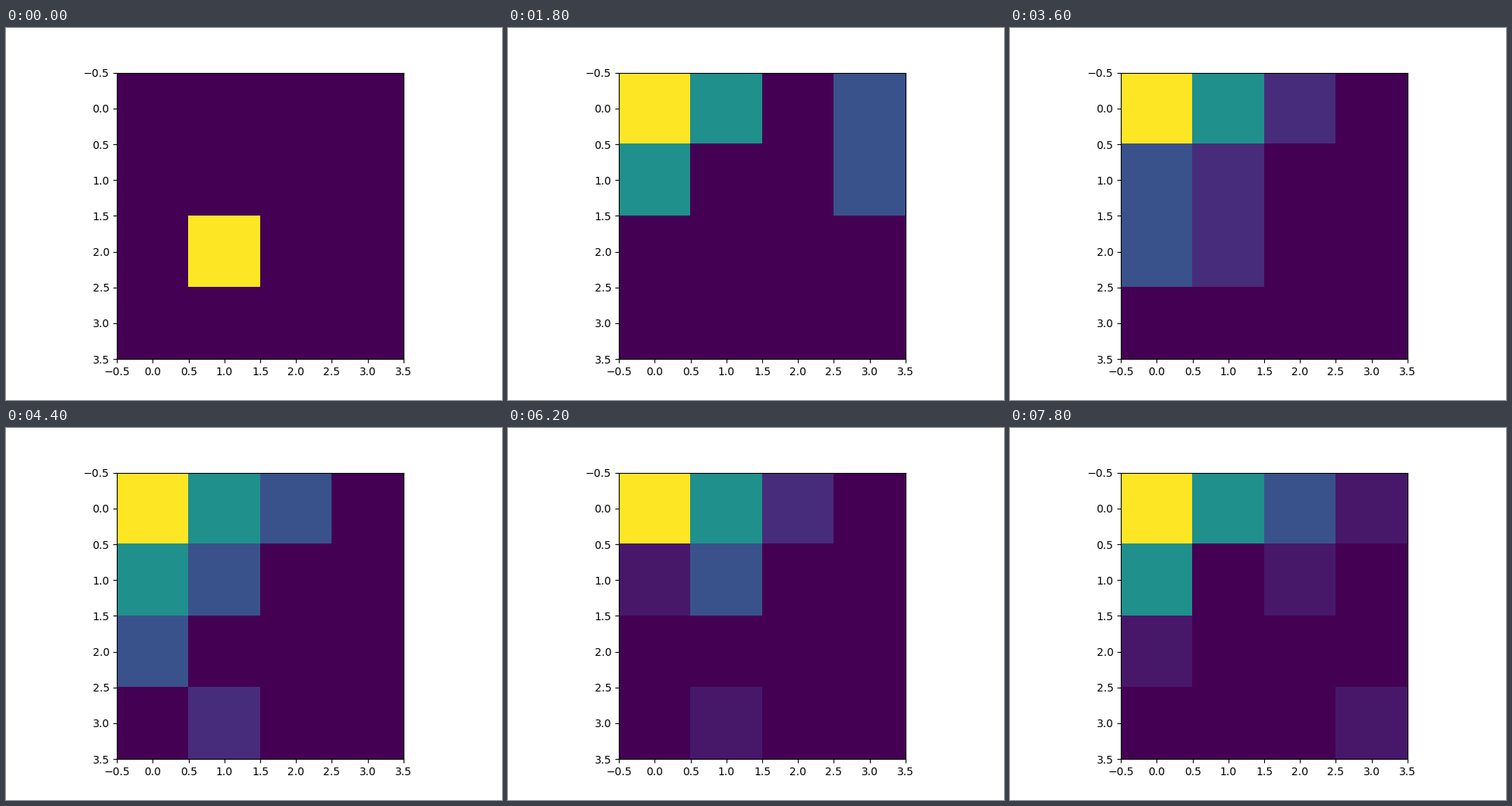
A matplotlib script that plays this animation: 640 px wide and 480 px high, repeating every 8000 ms.

```python
import numpy as np
import matplotlib.pyplot as plt
from matplotlib.animation import FuncAnimation

SIZE = 4
STEP_MS = 200

# Row and column of the new tile placed at every step.
SPAWNS = (
    "21 03 32 21 13 32 33 12 23 13 31 22 13 12 23 12 30 23 21 31 "
    "32 22 31 32 23 31 23 22 23 31 22 31 32 13 30 22 33 21 32 33"
).split()


def slide(line):
    """Push a line to its start, merging equal neighbours once."""
    tiles = [v for v in line if v]
    out = []
    while tiles:
        value = tiles.pop(0)
        if tiles and tiles[0] == value:
            value += tiles.pop(0)
        out.append(value)
    return out + [0] * (SIZE - len(out))


def move_left(board):
    return np.array([slide(row) for row in board])


def move_up(board):
    return move_left(board.T).T


def play():
    """Alternate up and left moves, adding a 2 after each one."""
    board = np.zeros((SIZE, SIZE), dtype=int)
    boards = []
    for step, (row, col) in enumerate(SPAWNS):
        board = move_up(board) if step % 2 else move_left(board)
        board[int(row), int(col)] = 2
        boards.append(board.copy())
    return boards


boards = play()

fig, ax = plt.subplots(figsize=(6.4, 4.8), dpi=100)
image = ax.imshow(boards[0], cmap="viridis", vmin=0, vmax=2)


def update(step):
    board = boards[step]
    image.set_data(board)
    image.set_clim(0, board.max())
    return [image]


anim = FuncAnimation(fig, update, frames=len(boards), interval=STEP_MS,
                     repeat=True, repeat_delay=0)
plt.show()
```
